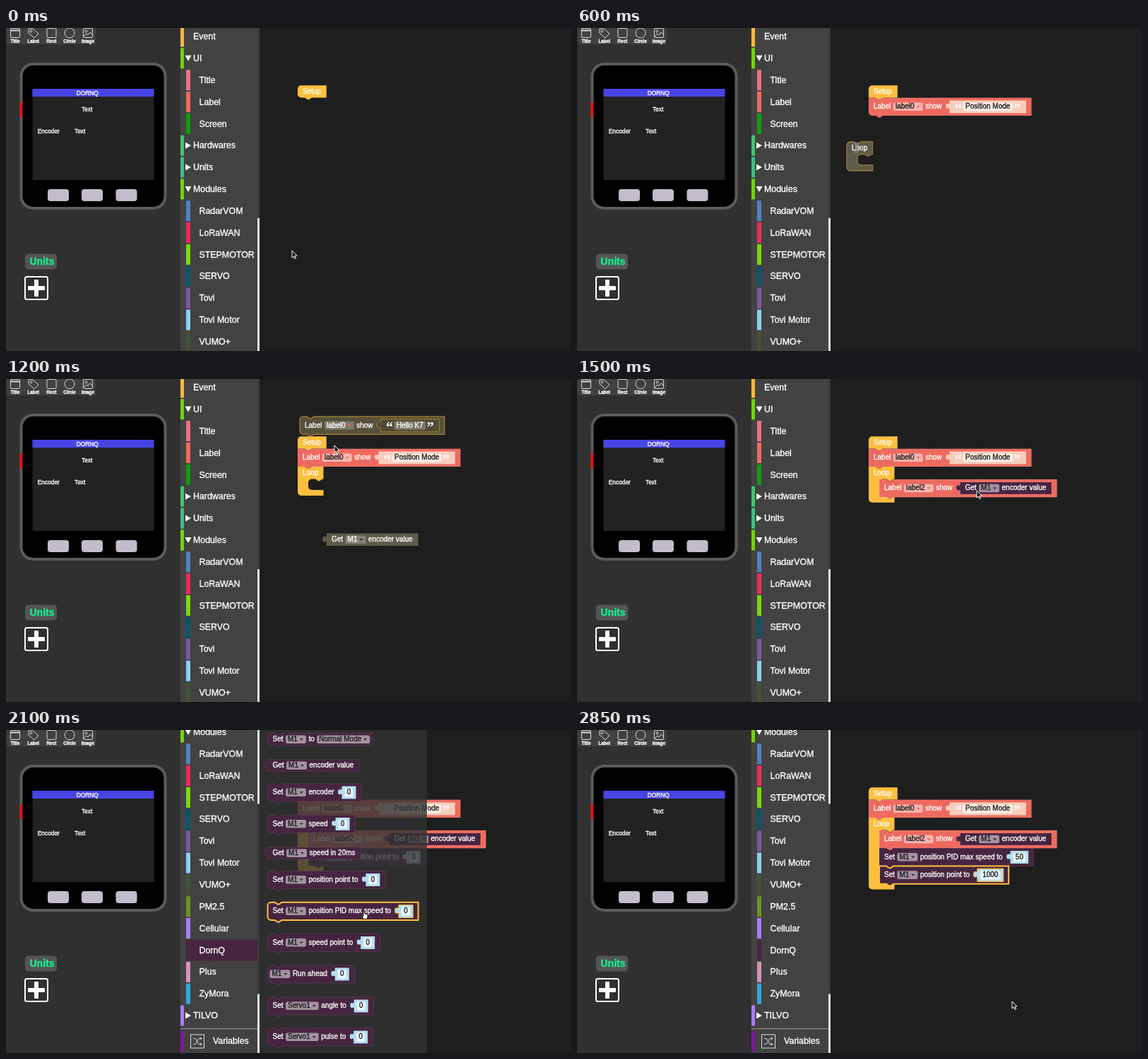
Write an HTML page with a canvas that moves like this. It is 800 px wide and 457 px high and loops after 3 s.

```html
<!DOCTYPE html>
<html lang="en">
<head>
<meta charset="utf-8">
<title>Block editor</title>
<style>
html, body { margin: 0; width: 100%; height: 100%; overflow: hidden; background: #1e1e1e; }
canvas { display: block; }
</style>
</head>
<body>
<canvas id="stage" width="800" height="457"></canvas>
<script>
const c = document.getElementById('stage').getContext('2d');
const SANS = '"Liberation Sans", Arial, sans-serif';
const YELLOW = '#fdbf3e', RED = '#ee6a60', PLUM = '#472540', GHOST = '#5e5c48';
const STEP = 150, STEPS = 20, ROW = 30.85, PITCH = 25.3;

function box(x, y, w, h, fill, r = 0) {
  c.fillStyle = fill;
  c.beginPath();
  c.roundRect(x, y, w, h, r);
  c.fill();
}
// A hairline stroke gives the letters a slightly heavier weight
function text(s, x, y, size = 10, fill = '#fff', align = 'left', weight = '') {
  c.font = `${weight} ${size}px ${SANS}`;
  c.textAlign = align;
  c.textBaseline = 'middle';
  c.fillStyle = c.strokeStyle = fill;
  c.lineWidth = .35;
  c.fillText(s, x, y + .5);
  c.strokeText(s, x, y + .5);
}
function poly(points, fill, stroke) {
  c.beginPath();
  points.forEach(([x, y]) => c.lineTo(x, y));
  c.closePath();
  if (fill) { c.fillStyle = fill; c.fill(); }
  if (stroke) { c.strokeStyle = stroke; c.stroke(); }
}
function paint(fill, stroke, width = 1) {
  c.fillStyle = fill;
  c.fill();
  if (stroke) {
    c.strokeStyle = stroke;
    c.lineWidth = width;
    c.stroke();
  }
}

// ---- blocks ----
function notch(x, y, dir) {
  const xs = dir > 0 ? [10, 14, 16, 20] : [20, 16, 14, 10];
  xs.forEach((d, i) => c.lineTo(x + d, y + (i % 3 ? 2.7 : 0)));
}
function stackPath(x, y, w, h, top, bottom, hat) {
  c.beginPath();
  c.moveTo(x, y + top);
  c.arcTo(x, y, x + 9, y, top);
  if (!hat) notch(x, y, 1);
  c.lineTo(x + w, y);
  c.lineTo(x + w, y + h);
  notch(x, y + h, -1);
  c.arcTo(x, y + h, x, y, bottom);
  c.closePath();
}
function valuePath(x, y, w, h) {
  c.beginPath();
  c.moveTo(x, y);
  c.lineTo(x + w, y);
  c.lineTo(x + w, y + h);
  c.lineTo(x, y + h);
  c.lineTo(x, y + 12.5);
  c.bezierCurveTo(x, y + 9, x - 5.4, y + 15, x - 5.4, y + 8);
  c.bezierCurveTo(x - 5.4, y + 1, x, y + 7, x, y + 3.5);
  c.closePath();
}

const menu = s => ({ kind: 'menu', s }), num = s => ({ kind: 'num', s });
const str = s => ({ kind: 'str', s }), sub = items => ({ kind: 'sub', items });
const M1 = menu('M1'), EXTRA = { menu: 15, num: 14.4, str: 45 };
const isValue = it => ['num', 'str', 'sub'].includes(it.kind);

function itemWidth(it) {
  if (it.kind === 'sub') return layout(it.items).width;
  c.font = `10px ${SANS}`;
  return c.measureText(it.s ?? it).width + (EXTRA[it.kind] || 0);
}
function layout(items) {
  let x = items[0].kind === 'menu' ? 3 : 7;
  const at = items.map((it, i) => {
    if (i) x += isValue(it) ? 11 : 3.5;
    const w = itemWidth(it), spot = [x, w];
    x += w;
    return spot;
  });
  return { at, width: x + (items.at(-1).kind === 'menu' ? 3 : 7.6) };
}
function drawItem(it, x, w, y, color, ghost, sel) {
  const field = ghost ? 'rgba(255,255,255,.24)' : 'rgba(255,255,255,.5)';
  const ink = ghost ? '#fff' : '#1c1c1c';
  if (it.kind === 'menu') {
    box(x, y - 5.5, w, 11.6, field, 2.5);
    text(it.s, x + 3, y, 10, ink);
    poly([[x + w - 9, y - 1], [x + w - 4, y - 1], [x + w - 6.5, y + 2]], color);
  } else if (it.kind === 'num') {
    valuePath(x, y - 8.5, w, 18);
    paint(ghost ? GHOST : '#b3def0', sel && YELLOW, 1.2);
    box(x + 4, y - 5.8, w - 8, 12.6, ghost ? field : '#ecf6fb', 2.5);
    text(it.s, x + w / 2, y, 10, ink, 'center');
  } else if (it.kind === 'str') {
    valuePath(x, y - 8.5, w, 18);
    paint(ghost ? '#514c38' : '#f8cdbc', ghost && '#a5822c');
    box(x + 19, y - 5.5, w - 38, 12, ghost ? field : '#fdeee6', 2.5);
    text(it.s, x + w / 2, y, 10, ink, 'center');
    c.font = 'bold 20px "Liberation Serif", serif';
    c.fillStyle = '#fff';
    c.fillText('“', x + 12.5, y + 4.8);
    c.fillText('”', x + w - 12.5, y + 4.8);
  } else if (it.kind === 'sub') {
    drawValue(x, y, it.items);
  } else text(it, x, y);
}
function drawItems(x, y, items, color, ghost, sel) {
  layout(items).at.forEach(([dx, w], i) => drawItem(items[i], x + dx, w, y, color, ghost, sel));
}
// y is the middle line of the block's text
function drawValue(x, y, items, ghost) {
  valuePath(x, y - 8.3, layout(items).width, 17);
  paint(ghost ? GHOST : PLUM, 'rgba(255,255,255,.12)', .7);
  drawItems(x, y, items, PLUM, ghost);
}
function drawStack(x, y, items, color, { ghost, sel, top = 5, bottom = 5, hat } = {}) {
  const tall = items.some(isValue), up = tall ? 12.2 : 8.7;
  stackPath(x, y - up, layout(items).width, tall ? 25.2 : 17.3, top, bottom, hat);
  const edge = ghost ? '#a5822c' : sel ? YELLOW : 'rgba(255,255,255,.12)';
  paint(ghost ? '#57513c' : color, edge, sel ? 2 : ghost ? 1.3 : .7);
  drawItems(x, y, items, color, ghost, sel);
}
function drawLoop(x, y, inner, ghost, r = 0) {
  const a = y + 17.5, b = a + inner;
  c.beginPath();
  c.moveTo(x, y + r);
  c.arcTo(x, y, x + 9, y, r);
  notch(x, y, 1);
  c.lineTo(x + 36.5, y);
  c.lineTo(x + 36.5, a);
  notch(x + 15, a, -1);
  c.arcTo(x + 15, a, x + 15, b, 5);
  c.arcTo(x + 15, b, x + 36, b, 5);
  c.lineTo(x + 36.5, b);
  c.lineTo(x + 36.5, b + 8);
  c.arcTo(x, b + 8, x, y, 5);
  c.closePath();
  paint(ghost ? GHOST : YELLOW, ghost && '#937a36', 1.3);
  text('Loop', x + 7, y + 8.5);
}

const getEncoder = ['Get', M1, 'encoder value'];
const showLabel = (name, value) => ['Label', menu(name), 'show', value];
const position = n => ['Set', M1, 'position point to', num(n)];
const maxSpeed = n => ['Set', M1, 'position PID max speed to', num(n)];

// ---- flyouts ----
const setLabel = (what, n) => ['Set', menu('label0'), what, num(n)];
const flyouts = {
  label: {
    row: 3, edge: 620, color: RED,
    list: [[40, showLabel('label0', str('Hello K7'))], [85, setLabel('x to', '0')], [129, setLabel('y to', '0')],
      [174, setLabel('width to', '0')], [218, setLabel('height to', '0')], [263, setLabel('rotate to', '0')],
      [307, setLabel('color to', '0')], [352, ['Set', menu('label0'), 'show']], [390, ['Set', menu('label0'), 'hide']]]
  },
  event: {
    row: 0, edge: 622, color: YELLOW,
    list: [[26, ['Setup']], [130, ['Button', menu('A'), menu('wasPressed')]],
      [180, ['Button', menu('A'), '+', menu('B'), menu('wasPressed')]], [230, ['Wait', num('1'), 's']]]
  },
  base: {
    row: 17, edge: 596, color: PLUM,
    list: [[13, ['Set', M1, 'to', menu('Normal Mode')]], [50, getEncoder], [88, ['Set', M1, 'encoder', num('0')]],
      [132.5, ['Set', M1, 'speed', num('0')]], [174, ['Get', M1, 'speed in 20ms']], [211.5, position('0')],
      [256, maxSpeed('0')], [300.5, ['Set', M1, 'speed point to', num('0')]], [345, [M1, 'Run ahead', num('0')]],
      [390, ['Set', menu('Servo1'), 'angle to', num('0')]], [434, ['Set', menu('Servo1'), 'pulse to', num('0')]]]
  }
};
function drawFlyout(name, pick) {
  const f = flyouts[name];
  box(359, 0, f.edge - 359, 457, 'rgba(51,51,51,.8)');
  f.list.forEach(([y, items], i) => {
    if (items[0] === 'Get') drawValue(370.5, y, items);
    else drawStack(370.5, y, items, f.color, { sel: i === pick, hat: items[0] === 'Setup' });
  });
  if (name === 'event') drawLoop(370.5, 60, 15.5, false, 5);
}

// ---- category list: name, colour, level (0 plain, 1 open, 2 closed, 3 child) ----
const categories = [['Event', '#fdb73e', 0], ['UI', '#75d40c', 1], ['Title', '#ee7180', 3], ['Label', RED, 3],
  ['Screen', '#129b10', 3], ['Hardwares', '#42c46b', 2], ['Units', '#3dbd85', 2], ['Modules', '#75d40c', 1],
  ['RadarVOM', '#5081c4', 3], ['LoRaWAN', '#f02a5c', 3], ['STEPMOTOR', '#7ad80a', 3], ['SERVO', '#0b546c', 3],
  ['Tovi', '#7a589f', 3], ['Tovi Motor', '#8ad0f2', 3], ['VUMO+', '#435234', 3], ['PM2.5', '#6a9422', 3],
  ['Cellular', '#a67ef8', 3], ['DornQ', PLUM, 3], ['Plus', '#d892b3', 3], ['ZyMora', '#30a8dc', 3],
  ['TILVO', '#a67ef8', 2]];

function drawMenu(scroll, chosen) {
  box(247, 0, 109, 457, '#424242');
  categories.forEach(([name, color, level], i) => {
    const y = 12 + ROW * i - scroll, child = level === 3;
    if (i === chosen) box(child ? 255 : 247, y - 15, child ? 101 : 109, 30, color);
    else box(child ? 255 : 247, y - 14.5, child ? 6 : 5, 29, color);
    if (level === 1) poly([[253.5, y - 4], [262.5, y - 4], [258, y + 4]], '#fff');
    if (level === 2) poly([[254, y - 4.5], [262, y], [254, y + 4.5]], '#fff');
    text(name, child ? 273.5 : 265, y + .2, 12.4);
  });
  const y = 12 + ROW * 20 - scroll + 36.5;
  box(247, y - 18.5, 109, 1.2, '#8a8a8a');
  box(247, y - 14.5, 5, 29, '#80179a');
  c.strokeStyle = '#ddd';
  c.lineWidth = 1;
  c.strokeRect(261.5, y - 9.5, 19, 19);
  c.beginPath();
  for (const s of [-1, 1]) {
    c.moveTo(265, y + 4 * s);
    c.lineTo(268, y + 4 * s);
    c.lineTo(273, y - 4 * s);
    c.lineTo(277, y - 4 * s);
    c.moveTo(275, y - 4 * s - 2);
    c.lineTo(277, y - 4 * s);
    c.lineTo(275, y - 4 * s + 2);
  }
  c.stroke();
  text('Variables', 293, y, 12.4);
  box(356, 0, 3, 457, '#e4e4e4');
  box(356, scroll * .464, 3, 269, '#3a3a3a');
}

// ---- device panel ----
function drawToolbar() {
  box(1, -4, 126, 27, '#404040', 3);
  ['Title', 'Label', 'Rect', 'Circle', 'Image'].forEach((s, i) => text(s, 13 + 25.7 * i, 18.7, 6.3, '#fff', 'center', 'bold'));
  c.strokeStyle = '#d8d8d8';
  c.lineWidth = 1;
  for (const x of [6.5, 58, 109.5]) {
    c.beginPath();
    c.roundRect(x, .5, 13, 13, 1.5);
    c.stroke();
  }
  box(7, 2.5, 12, 2, '#d8d8d8');
  poly([[32, 1], [38, 1], [46, 8], [40, 14], [32, 7]], null, '#d8d8d8');
  c.beginPath();
  c.arc(35.5, 4.5, 1.4, 0, 7);
  c.moveTo(97, 7);
  c.arc(90, 7, 7, 0, 7);
  c.moveTo(115, 4.5);
  c.arc(113.5, 4.5, 1.5, 0, 7);
  c.moveTo(110, 12);
  c.lineTo(114, 8);
  c.lineTo(116, 10);
  c.lineTo(119, 6);
  c.lineTo(122, 9);
  c.stroke();
}
function drawDevice() {
  box(0, 0, 247, 457, '#303030');
  drawToolbar();
  box(19.5, 49, 208, 208, '#5b5b5b', 19);
  box(23.5, 53, 200, 200, '#000', 15);
  box(19.5, 105, 3.5, 21, '#f00c0c');
  box(37.5, 86, 172, 129, '#222');
  box(37.5, 86, 172, 11, '#4845e6');
  text('DORNQ', 115.3, 92.2, 8.4, '#fff', 'center');
  text('Text', 114.6, 115, 8.4, '#fff', 'center');
  text('Encoder', 44.7, 145.8, 8.4);
  text('Text', 97, 146.3, 8.4);
  for (const x of [59, 107, 155.5]) box(x, 228, 30, 17, '#c2bccb', 4);
  box(27, 319.5, 45, 22, '#555', 5);
  text('Units', 33.5, 330.5, 14, '#12f090', 'left', 'bold');
  c.strokeStyle = '#fff';
  c.lineWidth = 2;
  c.beginPath();
  c.roundRect(27, 352, 32, 32, 2.5);
  c.stroke();
  box(31, 365, 24, 6, '#fff', 1);
  box(40, 356, 6, 24, '#fff', 1);
}

function drawPointer(kind, x, y) {
  c.save();
  c.translate(x, y);
  c.lineWidth = 1;
  if (kind === 'arrow') poly([[0, 0], [0, 10], [2.3, 8], [4, 11.5], [5.6, 10.8], [4, 7.3], [7, 7]], '#111', '#fff');
  else if (kind === 'hand')
    poly([[-1, -5], [.5, -5], [1, -1], [5, 0], [5, 4], [3.5, 6.5], [-.5, 6.5], [-3, 2], [-1, 2]], '#fff', '#222');
  else for (const [w, color] of [[2.4, '#fff'], [1, '#222']]) {
    c.lineWidth = w;
    c.strokeStyle = color;
    c.beginPath();
    c.moveTo(-2.5, -6); c.lineTo(0, -5); c.lineTo(2.5, -6);
    c.moveTo(0, -5); c.lineTo(0, 5);
    c.moveTo(-2.5, 6); c.lineTo(0, 5); c.lineTo(2.5, 6);
    c.stroke();
  }
  c.restore();
}

// One entry per step: pointer kind, x, y, flyout, picked block
const actions = [
  ['arrow', 405, 315], ['hand', 430, 43, 'label', 0], ['arrow', 470, 112], ['hand', 388, 71, 'event'],
  ['beam', 396, 169], ['arrow', 300, 338], ['hand', 478, 218, 'base', 5], ['arrow', 472, 229],
  ['arrow', 465, 94], ['arrow', 470, 158], ['arrow', 566, 158], ['arrow', 300, 312],
  ['arrow', 393, 287, 'base'], ['arrow', 476, 186], ['hand', 507, 261, 'base', 6], ['arrow', 545, 310],
  ['arrow', 560, 185], ['beam', 632, 180], ['beam', 596, 205], ['arrow', 616, 384]
];

function drawProgram(i) {
  const joined = { top: 0, bottom: 0 };
  const alone = i < 2;
  drawStack(413, 89.9, ['Setup'], YELLOW, { hat: true, bottom: alone ? 5 : 0 });
  if (i >= 5) {
    const rows = (i >= 9) + (i >= 13) + (i >= 16);
    drawLoop(413, 124, rows ? rows * PITCH : 15.5);
  }
  if (!alone)
    drawStack(413, 111, showLabel('label0', str(i < 3 ? 'Hello K7' : 'Position Mode')), RED,
      { top: 0, bottom: i < 5 ? 5 : 0, sel: i === 2 });
  if (i >= 9) {
    const value = i < 10 ? str('Hello K7') : sub(getEncoder);
    drawStack(428, 154.2, showLabel(i < 10 ? 'label0' : 'label2', value), RED, { ...joined, sel: i === 9 });
  }
  const second = 154.2 + PITCH, third = second + PITCH;
  if (i >= 16) drawStack(428, second, maxSpeed(i < 17 ? '0' : '50'), PLUM, { ...joined, sel: i < 18 });
  if (i >= 13)
    drawStack(428, i < 16 ? second : third, position(i < 18 ? '0' : '1000'), PLUM, { ...joined, sel: i === 13 || i >= 18 });
  // Loose blocks being dragged
  if (i === 4) drawLoop(382, 161, 15.5, true, 5);
  if (i >= 7 && i < 10) drawValue(454, 227, getEncoder, true);
  if (i === 8) drawStack(416, 65.3, showLabel('label0', str('Hello K7')), RED, { ghost: true });
  if (i === 15) drawStack(430, 306, maxSpeed('0'), PLUM, { ghost: true });
}

function draw(i) {
  const [kind, x, y, flyout, pick] = actions[i];
  const scroll = i >= 11 ? 225 : i >= 5 && i <= 7 ? 198 : 0;
  box(0, 0, 800, 457, '#1e1e1e');
  for (let gy = 9; gy < 457; gy += 13.6)
    for (let gx = 373; gx < 800; gx += 13.6) box(gx, gy, 1.1, 1.1, '#383838');
  drawProgram(i);
  if (flyout) drawFlyout(flyout, pick);
  drawDevice();
  drawMenu(scroll, flyout && flyouts[flyout].row);
  drawPointer(kind, x, y);
}

function tick() {
  draw(Math.floor(performance.now() / STEP) % STEPS);
  requestAnimationFrame(tick);
}
tick();
</script>
</body>
</html>
```
